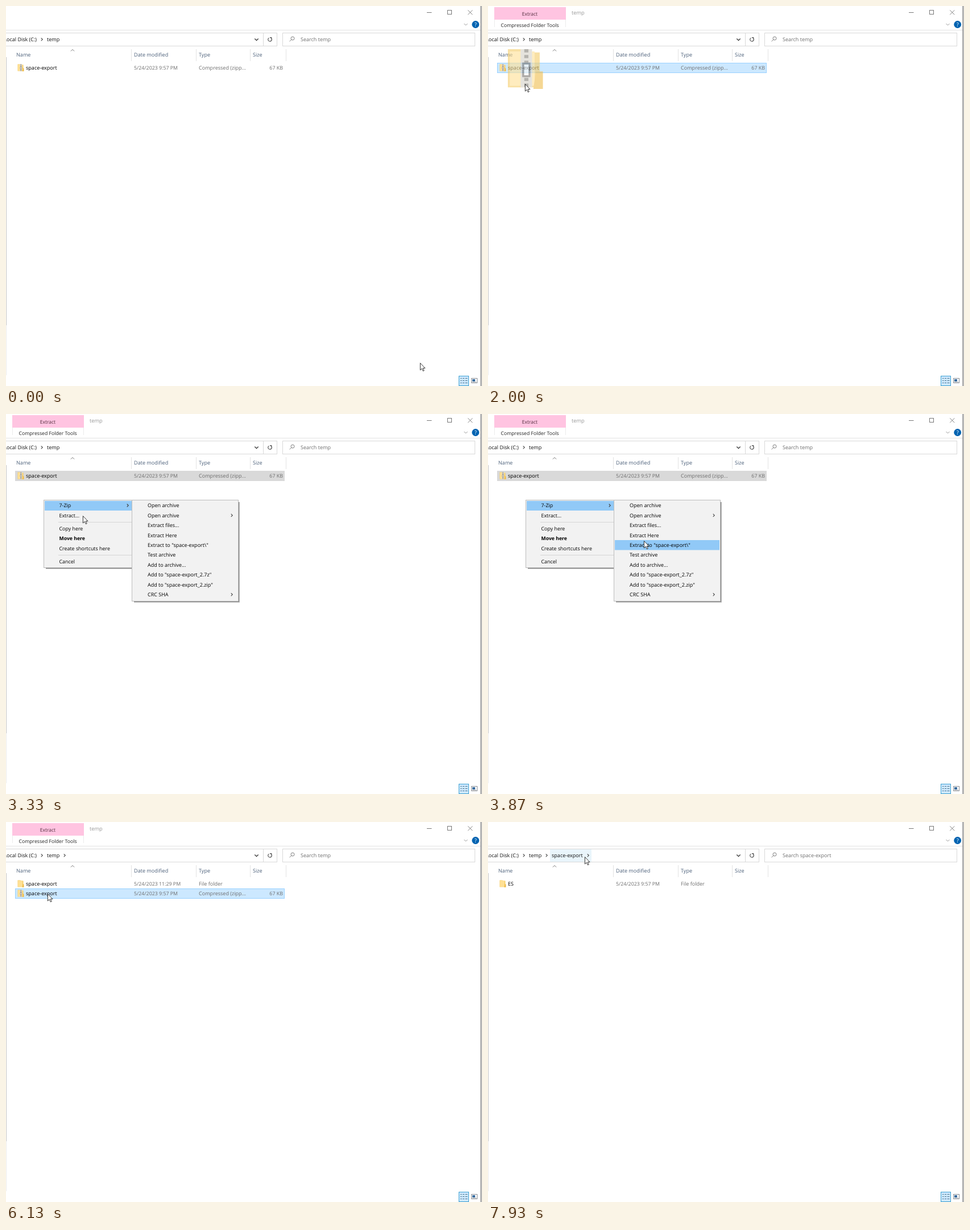
Animation, 837 px wide and 669 px high, one loop 8 s. Source, as an HTML page:

```html
<!DOCTYPE html>
<html lang="en">
<head>
<meta charset="utf-8">
<title>Extracting an archive</title>
<style>
html, body { margin: 0; width: 100%; height: 100%; overflow: hidden; background: #fff; }
svg { display: block; width: 837px; height: 669px; }
text { font: 9px "Open Sans", "Noto Sans", sans-serif; text-rendering: geometricPrecision; white-space: pre; }
</style>
</head>
<body>
<svg viewBox="0 0 837 669">
  <defs>
    <g id="folder">
      <path d="M0 .5H5L6 1.5H10V12.5H0Z" fill="#f5cd68"/>
      <path d="M.6 1.2H8.4V12H.6Z" fill="#ffe094"/>
      <path d="M8.8 7.5H11V13H8Z" fill="#efbd4d"/>
    </g>
    <g id="zip">
      <use href="#folder"/>
      <path d="M4 .5H7.6V12.5H4Z" fill="#d5d2c8"/>
      <path d="M5.8 .5V12.5" stroke="#85817a" stroke-width="1.3" stroke-dasharray="1 .8"/>
      <path d="M4.8 5H6.8V9H4.8Z" fill="#f6f6f3" stroke="#77736d" stroke-width=".6"/>
    </g>
  </defs>
  <g id="frame"></g>
  <g id="scene"></g>
  <path id="cursor" d="M.4 .6V13L3.3 10.3L5.3 14.7L7.2 13.9L5.3 9.6H9Z" fill="#fff" stroke="#111" stroke-width=".85"/>
</svg>
<script>
const LOOP = 8000, TICK = 1000 / 15;
const $ = id => document.getElementById(id);

// Drawing helpers; text is placed by its vertical centre.
const esc = s => s.replace(/"/g, '&quot;');
const rect = (x, y, w, h, fill, stroke) => stroke
  ? `<rect x="${x + .5}" y="${y + .5}" width="${w - 1}" height="${h - 1}" fill="${fill}" stroke="${stroke}"/>`
  : `<rect x="${x}" y="${y}" width="${w}" height="${h}" fill="${fill}"/>`;
const text = (s, x, y, fill = '#111', size = 9, more = '') =>
  `<text x="${x}" y="${y + 3.3}" fill="${fill}" style="font-size:${size}px" ${more}>${esc(s)}</text>`;
const line = (d, stroke, width = 1) =>
  `<path d="${d}" fill="none" stroke="${stroke}" stroke-width="${width}"/>`;
const right = (x, y, r = 2.5, color = '#444') =>
  line(`M${x - r / 2} ${y - r}L${x + r / 2} ${y}L${x - r / 2} ${y + r}`, color, 1.1);
const down = (x, y, r, color, width = 1.1) =>
  line(`M${x - r} ${y - r / 2}L${x} ${y + r / 2}L${x + r} ${y - r / 2}`, color, width);
const icon = (id, x, y) => `<use href="#${id}" x="${x}" y="${y}"/>`;

function drawFrame() {
  return [
    line('M0 42.5H835', '#e3e3e3'),
    line('M.5 90V562', '#c6c6c6'),
    line('M.5 562V650', '#ededed'),
    line('M835.2 0V669', '#858585', 1.5),
    line('M836.5 0V669', '#dedede'),
    line('M740 11.5H748.5', '#777'),
    rect(776, 7, 8, 8, '#fff', '#777'),
    line('M812.3 7.3L820.3 15.3M820.3 7.3L812.3 15.3', '#777', .9),
    down(808.5, 32.5, 3, '#999', 1),
    '<circle cx="825.7" cy="32.5" r="6.4" fill="#0063b1"/>',
    text('?', 825.7, 32.5, '#fff', 9.5, 'text-anchor="middle" font-weight="700"'.replace('font-weight="700"', '')),
    rect(-2, 47, 479, 24, '#fff', '#d9d9d9'),
    line('M452.5 47V70', '#d9d9d9'),
    down(440.5, 59, 3.2, '#444', 1.4),
    line('M462.2 56.2A3.3 3.3 0 1 0 466.2 56.4M466.8 58.6V55.6H463.9', '#444', 1.1),
    rect(486, 47, 339, 24, '#fff', '#d9d9d9'),
    '<circle cx="504" cy="57" r="3" fill="none" stroke="#777" stroke-width=".9"/>',
    line('M501.8 59.2L498.6 62.4', '#777', .9),
    rect(796, 651, 18, 18, '#cce8ff', '#3c9fd0'),
    [655, 659, 663].map(y =>
      line(`M799 ${y + .5}H801.5M803 ${y + .5}H806M807.5 ${y + .5}H811.5`, '#52768c')).join(''),
    rect(818, 655, 11, 9, '#fff', '#8a8f96'),
    rect(820, 657, 5, 4, '#3b6ea0'),
    line('M820 662H827', '#8a8f96', .8)
  ].join('');
}

// Cursor path: tick, x, y, easing (smooth unless named).
const path = [
  [0, 728, 628], [11, 62, 124], [13, 62, 124], [17, 62, 113], [18, 62, 113], [20, 63, 112],
  [24, 63, 112], [34, 66, 151], [36, 68, 153], [37, 78, 165], [39, 84, 170], [40, 84, 170],
  [43, 86, 164], [46, 86, 164], [58, 274, 223], [59, 274, 224], [63, 274, 224],
  [71, 163, 211, 'in'], [72, 134, 209], [73, 117, 208], [74, 108, 207], [76, 108, 207],
  [80, 100, 202], [85, 100, 202], [92, 73, 126], [97, 73, 126], [102, 74, 110],
  [109, 74, 110], [119, 170, 61]
];
const ease = { smooth: p => p * p * (3 - 2 * p), in: p => p * p };

function cursorAt(n) {
  const i = path.findIndex(k => k[0] >= n);
  if (i < 1) return path[i ? path.length - 1 : 0].slice(1, 3);
  const [t0, x0, y0] = path[i - 1], [t1, x1, y1, mode = 'smooth'] = path[i];
  const p = ease[mode]((n - t0) / (t1 - t0));
  return [x0 + (x1 - x0) * p, y0 + (y1 - y0) * p];
}

const zipFile = { icon: 'zip', name: 'space-export', date: '5/24/2023 9:57 PM', type: 'Compressed (zipp...', size: '67 KB' };
const newFolder = { icon: 'folder', name: 'space-export', date: '5/24/2023 11:29 PM', type: 'File folder' };
const inner = { icon: 'folder', name: 'ES', date: '5/24/2023 9:57 PM', type: 'File folder' };

function filesAt(n) {
  if (n >= 110) return [inner];
  if (n >= 86) return [newFolder, zipFile];
  return n >= 77 ? [zipFile, newFolder] : [zipFile];
}

function selectedAt(n) {
  if (n >= 110 || n < 22) return null;
  return n >= 105 ? newFolder : zipFile;
}

function drawRows(n, x, y) {
  const selected = selectedAt(n), grey = n >= 36 && n < 60;
  const free = !grey && x > 16 && x < 490;
  const files = filesAt(n);
  const back = files.map((f, i) => {
    const top = 100 + 17 * i;
    if (f === selected) return grey ? rect(16, top, 474, 18, '#d9d9d9') : rect(16, top, 474, 18, '#cce8ff', '#99d1ff');
    return free && y >= top + 1 && y < top + 17 ? rect(16, top + 1, 474, 17, '#e5f3ff') : '';
  });
  const cells = files.map((f, i) => {
    const mid = 109 + 17 * i;
    return icon(f.icon, 20.5, mid - 7) + text(f.name, 35, mid, '#000', 9.06) +
      text(f.date, 225, mid, '#6d6d6d', 8.82) + text(f.type, 339, mid, '#6d6d6d', 9.05) +
      text(f.size || '', 487, mid, '#6d6d6d', 8.9, 'text-anchor="end"');
  });
  return back.join('') + cells.join('');
}

function drawHeader(x, y) {
  const hover = x > 5 && x < 219 && y >= 76 && y < 97;
  const titles = [['Name', 18], ['Date modified', 225], ['Type', 339], ['Size', 434]];
  return (hover ? rect(5, 76, 215, 21, '#d9ebf9') : '') +
    titles.map(([s, at]) => text(s, at, 86, '#4c607a', 9.1)).join('') +
    [220, 334, 429, 492].map(at => line(`M${at}.5 76V97`, '#e3e3e3')).join('') +
    line('M114 79.5L117 76.5L120 79.5', '#666', .9);
}

function drawAddress(n, x, y) {
  const entered = n >= 110;
  let out = text('Local Disk (C:)', 54, 58.5, '#111', 9, 'text-anchor="end"') + right(63, 58.8) +
    text('temp', 72, 58.5, '#111', 9.1) + (n >= 83 ? right(103, 58.8) : '');
  if (entered) {
    if (y < 70 && x > 109 && x < 182) out += rect(109, 48, 73, 22, '#e9f5fb');
    out += text('space-export', 112, 58.5, '#111', 9.06) + right(176, 58.8);
  }
  return out + text(entered ? 'Search space-export' : 'Search temp', 518, 58.5, '#6d6d6d', 9.04);
}

function drawRibbon() {
  return rect(11, 2, 126, 22, '#ffc4e1') + line('M11.5 24V37M136.5 24V37', '#ececec') +
    text('Extract', 73.5, 13.5, '#4d2b3c', 8.5, 'text-anchor="middle"') +
    text('Compressed Folder Tools', 73.5, 33.3, '#222', 8.7, 'text-anchor="middle"') +
    text('temp', 147, 12, '#999', 9.25);
}

const dropMenu = [['7-Zip', 161, 1], ['Extract...', 178.5], ['Copy here', 201.5],
  ['Move here', 219], ['Create shortcuts here', 236.5], ['Cancel', 259.5]];
const zipMenu = ['Open archive', 'Open archive', 'Extract files...', 'Extract Here', 'Extract to "space-export\\"',
  'Test archive', 'Add to archive...', 'Add to "space-export_2.7z"', 'Add to "space-export_2.zip"', 'CRC SHA'];

const panel = (x, y, w, h) => rect(x + 4, y + 4, w - 2, h - 2, '#c2c2c2') +
  rect(x + 4, y + 4, w - 3, h - 3, '#858585') + rect(x, y, w, h, '#f2f2f2', '#bcbcbc');

function drawMenus(n, x, y) {
  let out = panel(66, 151, 160, 120) + rect(68, 153, 156, 17, '#91c9f7') +
    line('M92 190.5H224M92 248.5H224', '#d5d5d5');
  dropMenu.forEach(([label, mid, more]) => {
    out += text(label, 93.5, mid, '#000', 8.9, label === 'Move here' ? 'font-weight="700" style="font-weight:700"' : '');
    if (more) out += right(214, mid);
  });
  out = out.replace(/style="font-size:8.9px" font-weight="700" style="font-weight:700"/, 'style="font-size:8.7px;font-weight:700"');
  if (n < 44) return out;
  out += panel(221, 151, 188, 179);
  const active = x > 223 ? Math.floor((y - 152.5) / 17.43) : -1;
  zipMenu.forEach((label, i) => {
    const mid = 161 + 17.43 * i;
    if (i === active) out += rect(223, Math.round(mid - 8.7), 184, 17.5, '#91c9f7');
    out += text(label, 249, mid, '#000', 9);
    if (i === 1 || i === 9) out += right(397, mid);
  });
  return out;
}

function draw(n) {
  const [x, y] = cursorAt(n);
  const dragging = n >= 25 && n < 36;
  $('scene').innerHTML = (n >= 22 && n < 105 ? drawRibbon() : '') + drawAddress(n, x, y) +
    drawHeader(x, y) + drawRows(n, x, y) +
    (dragging ? `<use href="#zip" opacity=".6" transform="translate(${x - 30} ${y - 64}) scale(5.6)"/>` : '') +
    (n >= 36 && n < 60 ? drawMenus(n, x, y) : '');
  $('cursor').setAttribute('transform', `translate(${Math.round(x)} ${Math.round(y)})`);
}

$('frame').innerHTML = drawFrame();
let shown = -1;
function play() {
  const time = Math.floor(performance.now() % LOOP / 10) * 10;
  const n = Math.floor((time + 3.4) / TICK) % 120;
  if (n !== shown) draw(shown = n);
  requestAnimationFrame(play);
}
play();
</script>
</body>
</html>
```
